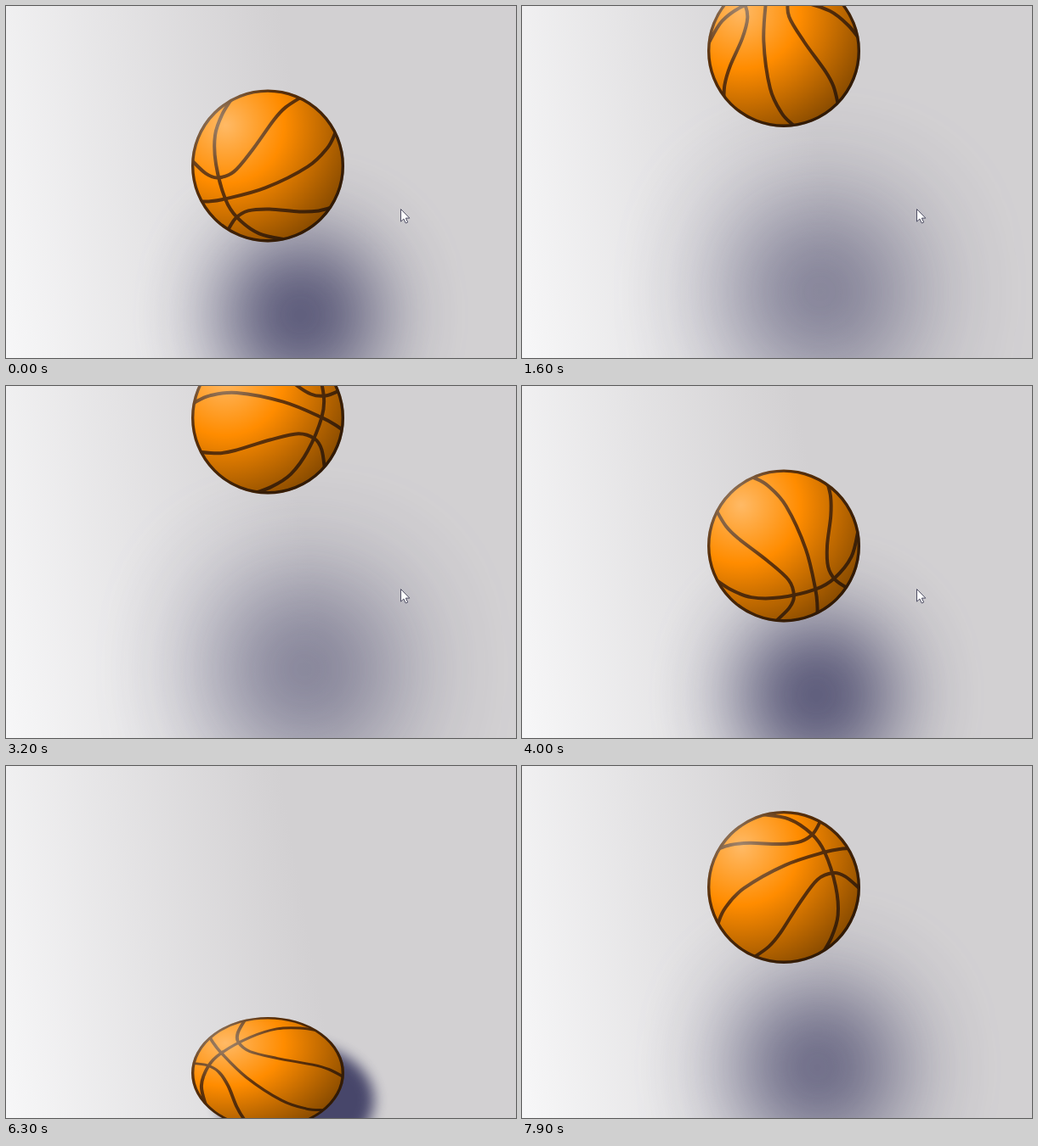
An HTML page for the animation above (8 s loop, 600x415 px).

```html
<!DOCTYPE html>
<html lang="en">
<head>
<meta charset="utf-8">
<title>Bouncing ball</title>
<style>
  html, body { margin: 0; width: 100%; height: 100%; overflow: hidden; background: #d2d0d2; }
  svg { position: absolute; left: 0; top: 0; width: 600px; height: 415px; display: block; }
</style>
</head>
<body>
<svg viewBox="0 0 600 415">
  <defs>
    <linearGradient id="wall" gradientUnits="userSpaceOnUse" x1="0" y1="415" x2="383" y2="346">
      <stop offset="0" stop-color="#f7f7f8"/>
      <stop offset="1" stop-color="#d2d0d2"/>
    </linearGradient>
    <radialGradient id="light" gradientUnits="userSpaceOnUse" cx="-50" cy="-48" r="160">
      <stop offset="0" stop-color="#fff" stop-opacity=".4"/>
      <stop offset=".43" stop-color="#fff" stop-opacity="0"/>
      <stop offset=".43" stop-color="#000" stop-opacity="0"/>
      <stop offset="1" stop-color="#000" stop-opacity=".48"/>
    </radialGradient>
    <filter id="soft" filterUnits="userSpaceOnUse" x="-400" y="-400" width="800" height="800" color-interpolation-filters="sRGB">
      <feGaussianBlur id="blur" stdDeviation="50"/>
    </filter>
    <clipPath id="round"><circle r="88.5"/></clipPath>
  </defs>
  <rect width="600" height="415" fill="url(#wall)"/>
  <g id="shadow" opacity=".92">
    <g filter="url(#soft)"><ellipse id="spot" rx="91" ry="91" fill="#3c3b62"/></g>
  </g>
  <g id="ball">
    <circle r="88" fill="#ff8c00"/>
    <g clip-path="url(#round)">
      <g id="seams" fill="none" stroke="#63350c" stroke-width="4"/>
    </g>
    <circle r="88.3" fill="none" stroke="#5a300a" stroke-width="3.4"/>
    <circle r="90" fill="url(#light)"/>
  </g>
  <path id="cursor" d="M464.5 239.5v14.6l3.4-3.1 2.4 5 2.3-1-2.3-4.9h4.5z" fill="#fff" stroke="#4c4c62" stroke-width="1"/>
</svg>
<script>
const LOOP = 8000, STEP = 100, BOUNCE = 2;
const CX = 308, R = 90, TOP = 31, LOW = 338;
const HIT = 0.253, LEAVE = 0.38, APEX_IN = 1.339, APEX_OUT = 1.362;
const TURN = 68; // degrees per second

const $ = id => document.getElementById(id);

// Catmull-Rom spline through x, y pairs
function spline(list) {
  const p = [];
  for (let i = 0; i < list.length; i += 2) p.push([list[i], list[i + 1]]);
  let d = "M" + p[0];
  for (let i = 0; i < p.length - 1; i++) {
    const a = p[i - 1] || p[i], b = p[i], c = p[i + 1], e = p[i + 2] || c;
    const h1 = b.map((v, k) => v + (c[k] - a[k]) / 6);
    const h2 = c.map((v, k) => v - (e[k] - b[k]) / 6);
    d += "C" + [h1, h2, c].join(" ");
  }
  return d;
}

const seams = [
  [-82, 42, -71, 42, -50, 39, -3, 26, 47, 1, 70, -21, 79, -38, 82, -47],
  [-39, -84, -53, -62, -62, -36, -61, -2, -50, 39, -36, 61, -10, 80, 22, 87],
  [-90, -7, -73, 9, -59, 14, -40, 7, -18, -19, 7, -54, 21, -69, 41, -82],
  [-48, 78, -38, 62, -23, 53, 2, 51, 37, 54, 60, 53, 78, 48]
];
for (const s of seams) {
  const path = document.createElementNS("http://www.w3.org/2000/svg", "path");
  path.setAttribute("d", spline(s));
  $("seams").append(path);
}

function pose(sec) {
  const t = sec % BOUNCE;
  const span = LOW - TOP;
  if (t >= HIT && t <= LEAVE) {
    const s = 1 - 0.29 * Math.sin(Math.PI * (t - HIT) / (LEAVE - HIT));
    return { y: LOW + R * (1 - s), s, lift: 0 };
  }
  let k = 0;
  if (t < HIT || t > APEX_OUT) {
    k = ((t < HIT ? t + BOUNCE : t) - APEX_OUT) / (HIT + BOUNCE - APEX_OUT);
  } else if (t < APEX_IN) {
    k = (APEX_IN - t) / (APEX_IN - LEAVE);
  }
  const y = TOP + span * k * k;
  return { y, s: 1, lift: LOW - y };
}

function draw(ms) {
  const sec = ms / 1000;
  const { y, s, lift } = pose(sec);
  $("ball").setAttribute("transform", `translate(${CX} ${y}) scale(1 ${s})`);
  $("seams").setAttribute("transform", `rotate(${TURN * sec})`);
  $("shadow").setAttribute("transform", `translate(${342 + lift * 0.03} ${394 - lift * 0.2})`);
  $("spot").setAttribute("ry", 91 * s);
  $("blur").setAttribute("stdDeviation", 8 + 0.35 * lift - 0.0004 * lift * lift);
  $("cursor").style.display = ms < 4600 ? "" : "none";
}

const start = performance.now();
let last = -1;
function tick() {
  const ms = Math.floor((performance.now() - start) % LOOP / STEP) * STEP;
  if (ms !== last) draw(last = ms);
  requestAnimationFrame(tick);
}
tick();
</script>
</body>
</html>
```
